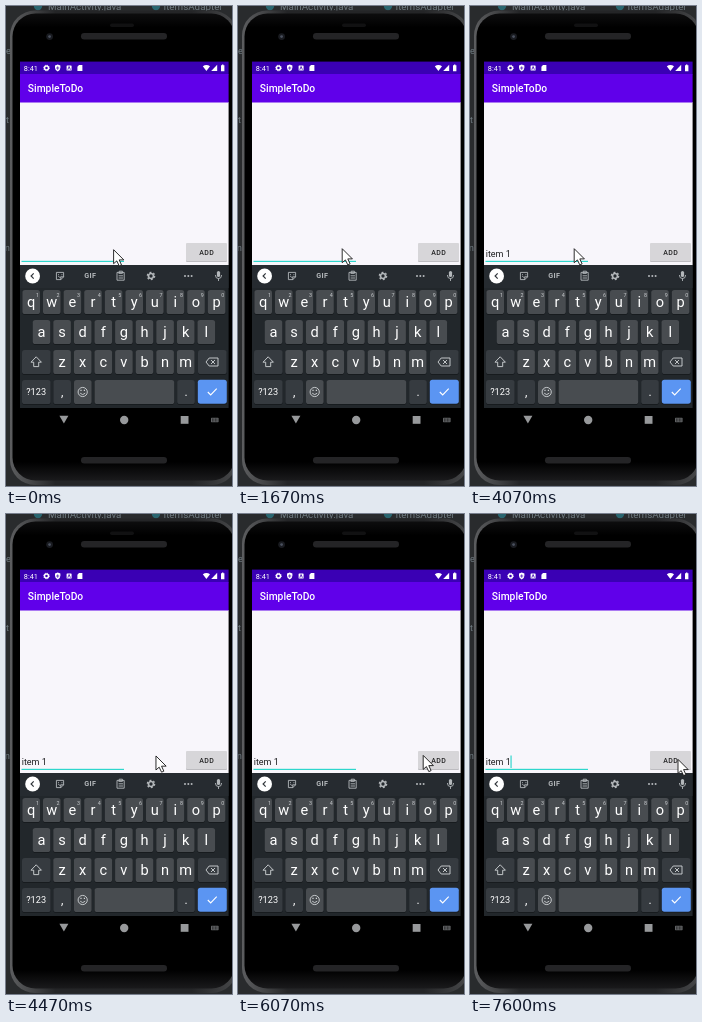
Write an HTML page that moves like this. It is 226x480 px and loops after 8000 ms.

```html
<!DOCTYPE html>
<html lang="en">
<head>
<meta charset="utf-8">
<title>To-do demo</title>
<style>
  html, body { margin: 0; width: 100%; height: 100%; overflow: hidden; background: #292b2d; }
  svg { display: block; width: 226px; height: 480px; }
  text { font-family: Roboto, "Noto Sans", sans-serif; }
  .mid { text-anchor: middle; }
  .line { fill: none; stroke: #b4b8bb; stroke-width: .9; stroke-linejoin: round; stroke-linecap: round; }
</style>
</head>
<body>
<svg viewBox="0 0 226 480" xmlns="http://www.w3.org/2000/svg">
  <defs>
    <linearGradient id="rim" x1="0" x2="1" y1="0" y2="0">
      <stop offset="0" stop-color="#5c5d5f"/>
      <stop offset=".1" stop-color="#434446"/>
      <stop offset=".2" stop-color="#242527"/>
      <stop offset=".8" stop-color="#242527"/>
      <stop offset="1" stop-color="#48494b"/>
    </linearGradient>
    <linearGradient id="glass" x1="0" x2="0" y1="0" y2="1">
      <stop offset="0" stop-color="#0d0d0e"/>
      <stop offset=".03" stop-color="#000"/>
      <stop offset=".96" stop-color="#000"/>
      <stop offset="1" stop-color="#1a1a1c"/>
    </linearGradient>
  </defs>

  <!-- editor behind the phone -->
  <rect width="226" height="480" fill="#292b2d"/>
  <g fill="#6f7a80" font-size="9.8">
    <circle cx="32" cy="0" r="4.2" fill="#2a6670"/>
    <text x="42" y="4">MainActivity.java</text>
    <circle cx="150" cy="0" r="4.2" fill="#2a6670"/>
    <text x="157.5" y="4">ItemsAdapter</text>
    <text x="0" y="48" font-size="9">e</text>
    <text x="0" y="117" font-size="9">t</text>
    <text x="-4" y="245" font-size="9">m</text>
  </g>

  <!-- phone -->
  <rect x="4" y="4.5" width="227" height="474.5" rx="25" fill="url(#rim)"/>
  <rect x="6.5" y="7.5" width="222" height="467" rx="23" fill="url(#glass)"/>
  <circle cx="43.6" cy="30.6" r="3.4" fill="#191b20"/>
  <circle cx="43.6" cy="30.6" r="1.4" fill="#4a505e"/>
  <rect x="104" y="17.5" width="24" height="3.5" rx="1.7" fill="#111112"/>
  <rect x="75" y="27" width="86" height="6.5" rx="3.2" fill="#242426"/>
  <rect x="75" y="451" width="86" height="6.5" rx="3.2" fill="#242426"/>

  <!-- app -->
  <rect x="14" y="55.6" width="208.6" height="371" fill="#000"/>
  <rect x="14" y="96" width="208.6" height="163" fill="#f8f6fb"/>
  <rect x="14" y="55.6" width="208.6" height="13" fill="#3a00b4"/>
  <rect x="14" y="68" width="208.6" height="28.5" fill="#6000ea"/>
  <g fill="#fff">
    <text x="17.8" y="65" font-size="7.3">8:41</text>
    <g transform="translate(40.5 62) scale(.7)">
      <circle r="2.8" fill="none" stroke="#fff" stroke-width="2"/>
      <circle r="4" fill="none" stroke="#fff" stroke-width="1.4" stroke-dasharray="1.6 1.54"/>
    </g>
    <path d="M51.7 58.6l2.7 1v2.2q0 2.4-2.7 3.7q-2.7-1.3-2.7-3.7v-2.2z"/>
    <path d="M51.7 60.4v3.4M50.1 62h3.2" stroke="#3a00b4" stroke-width=".7"/>
    <rect x="60.6" y="59.5" width="5" height="5" rx=".6"/>
    <path d="M61.8 63.7l1.3-3.2 1.3 3.2" fill="none" stroke="#3a00b4" stroke-width=".8"/>
    <path d="M73 59h3.4v6h-5v-4.3z"/>
    <path d="M196.8 60.2q3.6-2.6 7.2 0l-3.6 4.8z"/>
    <path d="M211.2 58.8v6.2h-6z"/>
    <path d="M215 59.2h1v-.8h1.4v.8h1v6h-3.4z"/>
    <text x="21.8" y="86" font-size="10.3" font-weight="500">SimpleToDo</text>
  </g>

  <!-- entry row -->
  <rect x="180" y="238" width="41" height="18" rx="1" fill="#bdbcc0"/>
  <rect x="180" y="237" width="41" height="18" rx="1" fill="#d7d6d9"/>
  <text class="mid" x="200.7" y="248.6" font-size="7" font-weight="500" letter-spacing=".3" fill="#232324">ADD</text>
  <rect x="15.5" y="254.8" width="102.5" height="1.2" fill="#2fd6cc"/>
  <text id="entry" x="15.7" y="250.8" font-size="9" fill="#1d1d1f" xml:space="preserve"></text>
  <rect id="compose" x="15.7" y="252" height=".7" fill="#333"/>
  <rect id="caret" y="241.5" width="1.1" height="12.5" fill="#22d3c9"/>

  <!-- keyboard -->
  <rect x="14" y="259" width="208.6" height="143" fill="#22272b"/>
  <rect x="14" y="259" width="208.6" height="23" fill="#262b30"/>
  <circle cx="26.6" cy="270" r="7.4" fill="#fff"/>
  <path id="chevron" fill="none" stroke="#30353a" stroke-width="1.2"/>
  <g id="tools">
    <path class="line" d="M50.8 266.4h6.8v4.4l-2.8 2.8h-4zM57.6 270.8h-2.8v2.8M52.5 268.6v.2M55.9 268.6v.2M52.5 270.6q.9 1 1.8.7"/>
    <text class="mid" x="84.2" y="272.4" font-size="7.2" font-weight="700" letter-spacing=".4" fill="#b4b8bb">GIF</text>
    <path class="line" d="M111.4 266.4h6.8v7.8h-6.8zM113.2 266.4v-1.2h3.2v2.2h-3.2zM113 269.8h3.6M113 272h3.6"/>
    <g transform="translate(145 270)" fill="none" stroke="#b4b8bb">
      <circle r="2.5" stroke-width="1.7"/>
      <circle r="3.7" stroke-width="1.2" stroke-dasharray="1.9 1.97"/>
    </g>
    <g fill="#b4b8bb">
      <circle cx="179" cy="270" r="1"/><circle cx="182.3" cy="270" r="1"/><circle cx="185.6" cy="270" r="1"/>
    </g>
  </g>
  <g id="words" class="mid" font-size="8.6" fill="#e2e5e7">
    <text x="60" y="273"></text><text x="117.5" y="273"></text><text x="175.5" y="273"></text>
  </g>
  <rect x="210.9" y="265" width="3.2" height="6" rx="1.6" fill="#b4b8bb"/>
  <path class="line" d="M209.4 269.4q0 3.2 3.1 3.2t3.1-3.2M212.5 272.6v2"/>
  <g id="keys"></g>
  <g fill="none" stroke="#d2d5d7" stroke-width=".9">
    <path d="M30.2 350.8l5.2 5.4h-2.7v4.4h-5v-4.4H25z"/>
    <path d="M203.2 352h8.8v8h-8.8l-3.2-4zM205 354l4 4M209 354l-4 4"/>
    <circle cx="76.7" cy="386" r="4.6"/>
    <path d="M74.2 387.2q2.5 2.8 5 0"/>
    <path d="M75 383.8v1.3M78.4 383.8v1.3" stroke-width="1.2"/>
    <path d="M201.8 386l2.9 2.9 6-6.2" stroke="#fff" stroke-width="1.1"/>
  </g>

  <!-- navigation -->
  <g fill="#97999b">
    <path d="M53.4 409.8h9l-4.5 7.6z"/>
    <circle cx="118.2" cy="414" r="4.2"/>
    <rect x="174.7" y="410" width="7.8" height="7.8"/>
    <rect x="205" y="411.8" width="7.6" height="4.4" rx=".6" fill="#626466"/>
    <path d="M206 413.1h6M206 414.9h6" stroke="#000" stroke-width=".9" stroke-dasharray=".8 .7"/>
  </g>

  <path id="mouse" d="M0 0V14L3.2 11.2L5.6 16.2L7.9 15.2L5.6 10.2H10.2Z" fill="#fff" stroke="#161616" stroke-width=".9" stroke-linejoin="round"/>
</svg>
<script>
const LOOP = 8000;
const $ = id => document.getElementById(id);

// Keyboard rows
const PITCH = 20.6, LIGHT = '#484c50', DARK = '#363b40';
let keys = '';
const key = (x, y, w, fill) =>
  keys += `<rect x="${x}" y="${y + .8}" width="${w}" height="24" rx="2.6" fill="#15181b"/>` +
          `<rect x="${x}" y="${y}" width="${w}" height="24" rx="2.6" fill="${fill}"/>`;
const label = (s, x, y, size, fill = '#fff') =>
  keys += `<text class="mid" x="${x}" y="${y}" font-size="${size}" fill="${fill}">${s}</text>`;
const row = (letters, first, y, hints) => [...letters].forEach((c, i) => {
  const x = first + i * PITCH;
  key(x - 8.8, y, 17.6, LIGHT);
  label(c, x, y + 17, 14.6);
  if (hints) label((i + 1) % 10, x + 6.2, y + 7.2, 5.4, '#c9cccf');
});
row('qwertyuiop', 25.2, 284, true);
row('asdfghjkl', 35.5, 314);
row('zxcvbnm', 56.1, 344);
key(16, 344, 28.6, DARK);
key(192, 344, 28.6, DARK);
key(16, 374, 28.6, DARK);
key(47.4, 374, 17.6, DARK);
key(68, 374, 17.6, LIGHT);
key(88.6, 374, 79.6, LIGHT);
key(171.2, 374, 17.6, DARK);
key(191.8, 373.7, 29, '#5b95f2');
label('?123', 30.2, 389.2, 9.2);
label(',', 56.1, 390, 12);
label('.', 180, 390, 12);
$('keys').innerHTML = keys;

// Each track is a list of [start time, value]
const TYPED = [[0, ''], [1930, 'i'], [2200, 'it'], [2470, 'ite'], [2730, 'item'], [3330, 'item '], [3530, 'item 1']];
const COMPOSING = [[0, false], [2000, true], [3530, false]];
const CARET = [[0, false], [200, true], [670, false], [1000, true], [1670, false], [1930, true], [4070, false],
  [4600, true], [5070, false], [5600, true], [6070, false], [6600, true], [7070, false], [7600, true]];
const WORDS = [[0, null], [2270, ["it's", 'it', 'its']], [2530, ['ite', "it's", 'items']],
  [2870, ['items', 'item', "item's"]], [3600, ['', '', '']], [3800, null]];
const MOUSE = [[0, 107.6, 243.7], [1265, 107.6, 243.7], [1400, 104.2, 242.7], [4070, 104.2, 242.7],
  [4800, 185.2, 241.4], [6560, 185.2, 241.4], [6800, 214.2, 251.4], [6930, 213.6, 250.8], [7270, 208, 245.4], [LOOP, 208, 245.4]];

const at = (track, t) => track.findLast(step => step[0] <= t)[1];
const ease = p => p * p * (3 - 2 * p);

function mouseAt(t) {
  const i = Math.max(1, MOUSE.findIndex(m => m[0] > t));
  const [a, b] = [MOUSE[i - 1], MOUSE[i]];
  const p = ease((t - a[0]) / (b[0] - a[0]));
  return [1, 2].map(k => a[k] + (b[k] - a[k]) * p);
}

const show = (el, on) => el.setAttribute('visibility', on ? 'visible' : 'hidden');
const advance = { i: .245, t: .327, e: .53, m: .877, ' ': .248, 1: .562 };
const widthOf = s => [...s].reduce((w, c) => w + advance[c] * 9, 0);

function draw(t) {
  const typed = at(TYPED, t), words = at(WORDS, t), end = widthOf(typed);
  $('entry').textContent = typed;
  $('compose').setAttribute('width', end);
  show($('compose'), at(COMPOSING, t));
  $('caret').setAttribute('x', 15.7 + end - (typed ? .3 : 0));
  show($('caret'), at(CARET, t));
  show($('tools'), !words);
  show($('words'), words);
  [...$('words').children].forEach((el, i) => el.textContent = words ? words[i] : '');
  $('chevron').setAttribute('d', words ? 'M25.5 267.4l2.6 2.6-2.6 2.6' : 'M27.7 267.4l-2.6 2.6 2.6 2.6');
  const tick = Math.floor((t + 5) * 15 / 1000) * 1000 / 15;
  $('mouse').setAttribute('transform', `translate(${mouseAt(tick)})`);
}

const start = performance.now();
(function frame() {
  draw((performance.now() - start) % LOOP);
  requestAnimationFrame(frame);
})();
</script>
</body>
</html>
```
